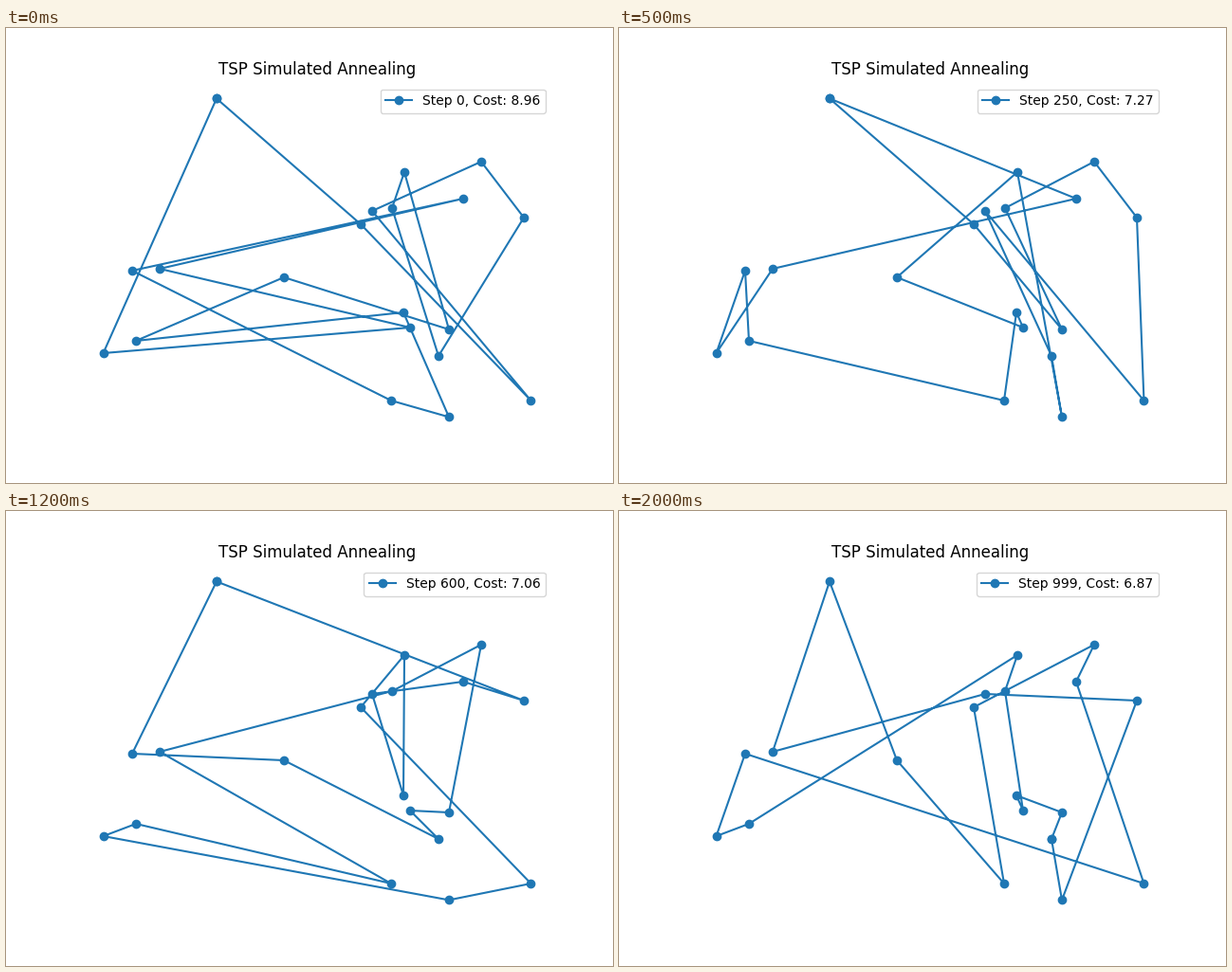
Recreate the animation shown at these times as a matplotlib script. Size 640 by 480 pixels, loop 2100 ms.

```python
import matplotlib.pyplot as plt
from matplotlib.animation import FuncAnimation

FRAMES, INTERVAL, STRIDE = 21, 100, 50

# City positions in stage pixels, y pointing down
CITIES = dict(
    A=(222, 74.4), B=(501, 141), C=(420, 152), D=(482, 180), E=(386, 193),
    F=(407, 190), G=(374, 207), H=(546, 200), I=(133, 256), J=(162, 254),
    K=(293, 263), L=(419, 300), M=(426, 316), N=(467, 318), O=(137, 330),
    P=(102.55, 343), Q=(456, 346), R=(406, 393), S=(467, 410.4),
    T=(553.45, 393),
)

# (first step, cost, visiting order) of each best tour found
TOURS = [
    (0, 8.96, "APMJDIRSLOKNCFQHBETG"),
    (50, 7.56, "ABTKGHJEMLSNQFDCRPIO"),
    (150, 7.27, "AGNFBHTEQSCKMLROIPJD"),
    (600, 7.06, "AIKQMNBFJROPSTGCLEDH"),
    (900, 6.87, "QNLMFCOPITDBGRKAJEHS"),
]

fig, ax = plt.subplots(figsize=(6.4, 4.8), dpi=100)
ax.set_title("TSP Simulated Annealing")
ax.set_xlim(80, 576)
ax.set_ylim(427.2, 57.6)
ax.axis("off")
line, = ax.plot([], [], "o-", color="tab:blue")


def update(i):
    step = min(i * STRIDE, 999)
    _, cost, order = [t for t in TOURS if t[0] <= step][-1]
    line.set_data(*zip(*(CITIES[c] for c in order + order[0])))
    line.set_label(f"Step {step}, Cost: {cost:.2f}")
    ax.legend(loc="upper right")
    return line,


anim = FuncAnimation(fig, update, frames=FRAMES, interval=INTERVAL,
                     repeat=True, repeat_delay=0)
plt.show()
```
